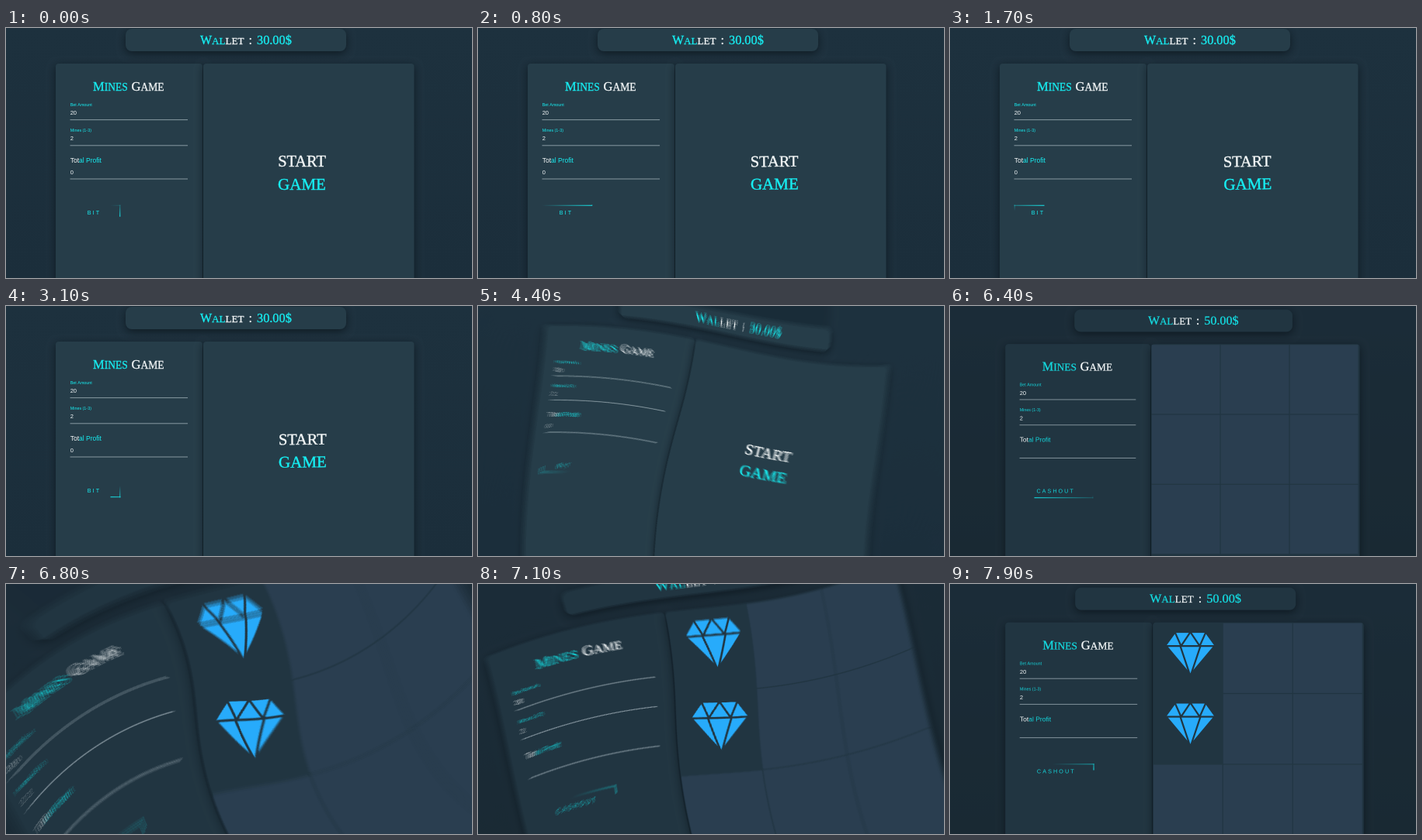
Animation, 600 px wide and 323 px high, one loop 8 s. Source, as an HTML page with a canvas:

```html
<!DOCTYPE html>
<html lang="en">
<head>
<meta charset="utf-8">
<title>Mines Game</title>
<style>
html, body { margin: 0; width: 100%; height: 100%; overflow: hidden; background: #1d2f3c; }
canvas { display: block; width: 600px; height: 323px; }
</style>
</head>
<body>
<canvas id="stage" width="600" height="323"></canvas>
<script>
const W = 600, H = 323, LOOP = 8000, STEP = 100, SS = 2;
const SERIF = '"Liberation Serif", serif', SANS = '"Liberation Sans", sans-serif';
const view = document.getElementById('stage').getContext('2d');
const buffer = document.createElement('canvas');
buffer.width = W * SS;
buffer.height = H * SS;
const layer = buffer.getContext('2d', { willReadFrequently: true });

const bet = { sky: ['#1d313e', '#1b2e3b'], panel: '#263d49', cyan: '#17eef2', line: '#8799a1',
  wallet: '30.00$', action: 'BIT', buttonWidth: 65, start: true };
const board = { sky: ['#1b2c38', '#192933'], panel: '#213541', cyan: '#14d6dc', line: '#82929b',
  wallet: '50.00$', action: 'CASHOUT', buttonWidth: 96, dx: 7.2, dy: 3.6 };
const covered = { ...board, phase: 0.7, zoom: 0.9886, gems: 0 };
const opened = { ...board, phase: 0.36, zoom: 1, gems: 2 };

const cuts = [
  { from: bet, to: covered, start: 3900, mid: 4600, end: 5200 },
  { from: covered, to: opened, start: 6395, mid: 6800, end: 7950 }
];

function text(g, str, x, y, size, color, family = SANS, spacing = 0) {
  g.font = `${size}px ${family}`;
  g.letterSpacing = spacing + 'px';
  g.fillStyle = g.strokeStyle = color;
  g.fillText(str, x, y);
  if (family === SERIF) {
    g.lineWidth = size / 50;
    g.strokeText(str, x, y);
  }
  return x + g.measureText(str).width;
}

// Serif word with a large first letter
function caps(g, word, x, y, size, color) {
  x = text(g, word[0], x, y, size, color, SERIF);
  return text(g, word.slice(1), x, y, size * 0.82, color, SERIF);
}

function card(g, scale, x, y, w, h, radius, color) {
  g.save();
  g.shadowColor = 'rgba(6,14,20,.65)';
  g.shadowBlur = 11 * scale;
  g.shadowOffsetY = 3 * scale;
  g.fillStyle = color;
  g.beginPath();
  g.roundRect(x, y, w, h, radius);
  g.fill();
  g.restore();
}

function trail(g, x0, y0, x1, y1, color) {
  const fade = g.createLinearGradient(x0, y0, x1, y1);
  fade.addColorStop(0, color + '00');
  fade.addColorStop(1, color);
  g.strokeStyle = fade;
  g.lineWidth = 1.3;
  g.beginPath();
  g.moveTo(x0, y0);
  g.lineTo(x1, y1);
  g.stroke();
}

// Four light trails chase each other around the button edge
function button(g, s, phase) {
  const x = 82.5, y = 228.5, w = s.buttonWidth, h = 19;
  g.save();
  g.beginPath();
  g.rect(x, y, w, h);
  g.clip();
  for (let side = 0; side < 4; side++) {
    const p = (phase - side / 4 + 2) % 1;
    if (p >= 0.5) continue;
    const a = 4 * p - 1, b = a + 1;
    if (side === 0) trail(g, x + a * w, y + 0.6, x + b * w, y + 0.6, s.cyan);
    if (side === 1) trail(g, x + w - 0.6, y + a * h, x + w - 0.6, y + b * h, s.cyan);
    if (side === 2) trail(g, x + w - a * w, y + h - 0.6, x + w - b * w, y + h - 0.6, s.cyan);
    if (side === 3) trail(g, x + 0.6, y + h - a * h, x + 0.6, y + h - b * h, s.cyan);
  }
  g.restore();
  text(g, s.action, 104.7, 240.8, 7.2, s.cyan, SANS, 2.1);
}

function path(g, ...points) {
  g.beginPath();
  for (let i = 0; i < points.length; i += 2) g.lineTo(points[i], points[i + 1]);
}

function gem(g, x, y, gap) {
  g.save();
  g.translate(x, y);
  path(g, -19, -26, 19, -26, 30.5, -10, 0, 26.5, -30.5, -10);
  g.closePath();
  g.fillStyle = '#27abfb';
  g.fill();
  g.strokeStyle = gap;
  g.lineWidth = 2.2;
  path(g, -32, -9, 32, -9);
  g.stroke();
  path(g, -20, -27, -12, -9, 0, -27, 12, -9, 20, -27);
  g.stroke();
  path(g, -13, -9, 0, 30, 13, -9);
  g.stroke();
  g.restore();
}

function tiles(g, s) {
  const x = 254, y = 46.5, w = 90, h = 91.4;
  for (let col = 0; col < 3; col++) for (let row = 0; row < 3; row++) {
    if (col === 0 && row < s.gems) {
      gem(g, x + 48.3, y + row * h + 39, s.panel);
    } else {
      g.fillStyle = '#2a3e50';
      g.fillRect(x + col * w + 0.6, y + row * h + 0.6, w - 1.2, h - 1.2);
    }
  }
}

function startLabel(g, s, t) {
  const sway = 1 - Math.cos(2 * Math.PI * t / 4000);
  g.save();
  g.translate(381 + sway, 187);
  g.rotate(-0.01 * sway);
  g.textAlign = 'center';
  text(g, 'START', 0, -8, 20.4, '#f4f8f8', SERIF);
  text(g, 'GAME', 0, 21.5, 21, s.cyan, SERIF);
  g.restore();
}

function drawScene(g, scale, s, t) {
  const white = '#f2f6f7';
  g.setTransform(scale, 0, 0, scale, 0, 0);
  const sky = g.createLinearGradient(0, 0, 0, H);
  s.sky.forEach((c, i) => sky.addColorStop(i, c));
  g.fillStyle = sky;
  g.fillRect(0, 0, W, H);
  if (!s.start) {
    g.translate(75, 10);
    g.scale(s.zoom, s.zoom);
    g.translate(s.dx - 75, s.dy - 10);
  }

  card(g, scale, 154, 1, 284, 29, 8, s.panel);
  let x = caps(g, 'WAL', 250, 20.5, 16, s.cyan);
  text(g, 'LET', x, 20.5, 13.1, white, SERIF);
  text(g, ':', 312.5, 20.5, 16, white, SERIF);
  text(g, s.wallet, 323, 20.5, 16.3, s.cyan, SERIF);

  card(g, scale, 64, 46, 189, 300, 4, s.panel);
  card(g, scale, 254, 46, 271.5, 300, 4, s.panel);

  caps(g, 'MINES', 112, 81, 16.5, s.cyan);
  caps(g, 'GAME', 161.5, 81, 16.5, white);
  text(g, 'Bet Amount', 82.7, 101, 5.4, s.cyan);
  text(g, '20', 82.7, 112.4, 7.5, white);
  text(g, 'Mines (1-3)', 82.7, 134, 5.4, s.cyan);
  text(g, '2', 82.7, 145.4, 7.5, white);
  x = text(g, 'Tot', 82.7, 174, 8.5, white);
  text(g, 'al Profit', x, 174, 8.5, s.cyan);
  if (s.start) text(g, '0', 82.7, 189, 7.5, white);
  g.fillStyle = s.line;
  for (const y of [118.1, 151.3, 194.5]) g.fillRect(82.5, y, 151.5, 1);

  button(g, s, s.phase ?? (0.45 + t / 1000) % 1);
  if (s.start) startLabel(g, s, t);
  else tiles(g, s);
}

// Twist about the centre (degrees, degrees per pixel) with zoom and radial blur
function twirl({ turn, twist, zoom, blur }) {
  const src = layer.getImageData(0, 0, W * SS, H * SS).data;
  const out = view.createImageData(W, H);
  const N = 12, cx = W / 2, cy = H / 2, maxX = W * SS - 1, maxY = H * SS - 1;
  for (let y = 0, o = 0; y < H; y++) for (let x = 0; x < W; x++, o += 4) {
    const dx = (x + 0.25 - cx) / zoom, dy = (y + 0.25 - cy) / zoom;
    const a = -(turn + twist * Math.hypot(dx, dy)) * Math.PI / 180;
    const c = Math.cos(a), n = Math.sin(a);
    const ux = dx * c - dy * n, uy = dx * n + dy * c;
    let r = 0, g = 0, b = 0;
    for (let i = 0; i < N; i++) {
      const z = 1 + blur * (2 * i / (N - 1) - 1);
      const sx = Math.max(0, Math.min(maxX, (cx + ux * z + (i & 1) / 2) * SS | 0));
      const sy = Math.max(0, Math.min(maxY, (cy + uy * z + (i >> 1 & 1) / 2) * SS | 0));
      const p = (sy * W * SS + sx) * 4;
      r += src[p];
      g += src[p + 1];
      b += src[p + 2];
    }
    out.data[o] = r / N;
    out.data[o + 1] = g / N;
    out.data[o + 2] = b / N;
    out.data[o + 3] = 255;
  }
  view.putImageData(out, 0, 0);
}

function render(t) {
  const cut = cuts.find(c => t > c.start && t < c.end);
  if (!cut) {
    drawScene(view, 1, t < cuts[0].end ? bet : t < cuts[1].mid ? covered : opened, t);
    // Before the first cut the bet screen shows; after it the covered board holds
    return;
  }
  if (t < cut.mid) {
    const k = ((t - cut.start) / (cut.mid - cut.start)) ** 2;
    drawScene(layer, SS, cut.from, t);
    twirl({ turn: 34.6 * k, twist: -0.083 * k, zoom: 1 - 0.07 * k, blur: 0.042 * k });
  } else {
    const k = ((cut.end - t) / (cut.end - cut.mid)) ** 3;
    drawScene(layer, SS, cut.to, t);
    twirl({ turn: -0.6 * k, twist: -0.125 * k, zoom: 1 + 0.42 * k, blur: 0.034 * k });
  }
}

// The picture advances ten times a second
let shown = -1;
function tick() {
  const t = Math.floor(performance.now() % LOOP / STEP) * STEP;
  if (t !== shown) render(shown = t);
  requestAnimationFrame(tick);
}
tick();
</script>
</body>
</html>
```
